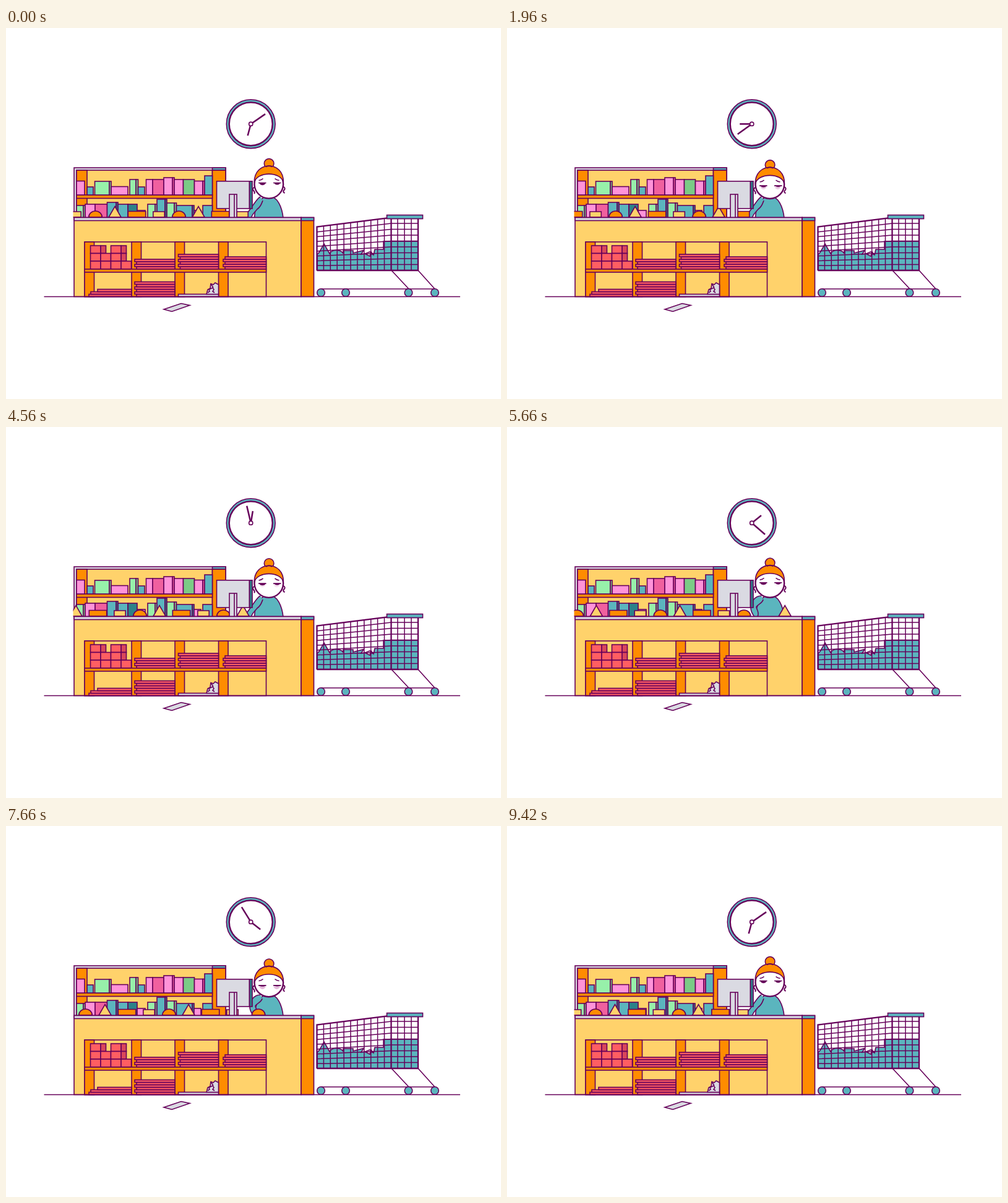
An HTML page that plays this animation: 800 by 600 pixels, repeating every 9440 ms.

```html
<!DOCTYPE html>
<html lang="en">
<head>
<meta charset="utf-8">
<title>Checkout</title>
<style>
  html, body { margin: 0; width: 100%; height: 100%; overflow: hidden; background: #fff; }
  svg { display: block; width: 800px; height: 600px; }
</style>
</head>
<body>
<svg id="stage" viewBox="0 0 800 600" fill="none" stroke="#66005a" stroke-width="1.6"></svg>
<script>
const LOOP = 9440, TURN = 9420;
const ORANGE = '#ff8c00', YELLOW = '#ffd26b', GREY = '#dadae2', TEAL = '#5bb5be',
      PINK = '#ff93d9', ROSE = '#f0609f', GREEN = '#97f0aa', LEAF = '#7bcb86',
      DEEP = '#2c8289', RED = '#ff5e62', CRIMSON = '#d9475a', INK = '#66005a';
const stage = document.getElementById('stage');

function add(parent, tag, attrs) {
  const el = document.createElementNS('http://www.w3.org/2000/svg', tag);
  for (const key in attrs) el.setAttribute(key, attrs[key]);
  parent.appendChild(el);
  return el;
}
const group = (attrs, parent = stage) => add(parent, 'g', attrs);
const path = (d, fill = 'none', parent = stage, width = 1.6) =>
  add(parent, 'path', { d, fill, 'stroke-width': width });
const circle = (cx, cy, r, fill, parent = stage, width = 1.6) =>
  add(parent, 'circle', { cx, cy, r, fill, 'stroke-width': width });
const box = (x1, y1, x2, y2, fill, parent = stage) =>
  add(parent, 'rect', { x: x1, y: y1, width: x2 - x1, height: y2 - y1, fill });
const lerp = (a, b, k) => a + (b - a) * k;

// Monotone cubic through [time, value] keys, at rest at both ends.
function track(t, keys) {
  const last = keys.length - 1;
  if (t <= keys[0][0]) return keys[0][1];
  if (t >= keys[last][0]) return keys[last][1];
  const chord = i => (keys[i + 1][1] - keys[i][1]) / (keys[i + 1][0] - keys[i][0]);
  const slope = i => {
    if (i === 0 || i === last) return 0;
    const a = chord(i - 1), b = chord(i);
    return a * b <= 0 ? 0 : 2 * a * b / (a + b);
  };
  let i = 0;
  while (t > keys[i + 1][0]) i++;
  const [t0, v0] = keys[i], [t1, v1] = keys[i + 1], span = t1 - t0, u = (t - t0) / span;
  return v0 + (v1 - v0) * u * u * (3 - 2 * u)
    + span * u * (1 - u) * (slope(i) * (1 - u) - slope(i + 1) * u);
}

function drawClock() {
  circle(395.7, 155.2, 39.4, TEAL);
  circle(395.7, 155.2, 35, '#fff', stage, 2.4);
  const pivot = group({ transform: 'translate(395.7 155.2)' });
  const hour = path('M0 0V-19.5', 'none', pivot, 2.5);
  const minute = path('M0 0V-28.3', 'none', pivot, 2.5);
  circle(0, 0, 3.1, '#fff', pivot);
  return { hour, minute };
}

// Each product: left, right, top, colour.
function drawRow(base, products) {
  for (const [left, right, top, fill] of products) box(left, top, right, base, fill);
}

function drawBackShelf() {
  box(110, 226, 355, 308, GREY);
  box(333.5, 226, 355, 230, TEAL);
  box(114, 230, 333.5, 308, YELLOW);
  box(114, 230, 131, 288, ORANGE);
  box(333.5, 230, 355, 308, ORANGE);
  box(114, 270, 333.5, 275.5, ORANGE);
  drawRow(270, [
    [114, 127, 247.5, PINK], [131, 141, 257, TEAL], [143.5, 167, 248, GREEN], [167, 170, 248, LEAF],
    [170, 197, 256.5, PINK], [200, 210, 245, GREEN], [210, 213.5, 245, LEAF], [213.5, 224, 257, TEAL],
    [226.5, 237, 245, PINK], [237, 255, 245, ROSE], [255, 269, 242, PINK], [269, 272, 242, ROSE],
    [272, 286.5, 245, PINK], [286.5, 304.5, 245, LEAF], [304.5, 318, 247.5, PINK],
    [318, 321, 247.5, ROSE], [321, 333.5, 239, TEAL]
  ]);
  drawRow(307, [
    [114, 125, 287, GREEN], [125, 128, 287, LEAF], [128, 144, 285, PINK], [144, 163.5, 285, ROSE],
    [163.5, 178, 282, TEAL], [178, 181, 282, DEEP], [181, 197, 285, TEAL], [197, 212, 285, DEEP],
    [212, 225, 295, PINK], [229, 241, 285, GREEN], [241, 244, 285, LEAF], [244, 257, 277, TEAL],
    [257, 260, 277, DEEP], [260, 272, 283, GREEN], [272, 275.5, 283, LEAF], [275.5, 301, 287, TEAL],
    [301, 304, 287, DEEP], [304, 315, 295, PINK], [318, 333.5, 287, TEAL]
  ]);
}

function drawCashier() {
  path('M401.5 307C402 288 411 272 425 272C439 272 446 290 448 307Z', TEAL);
  const head = group();
  path('M402 257q-5 3-2 6t1 5M447.5 256q5 3 2 6t1 5', 'none', head, 2);
  circle(424.8, 252.3, 23.3, '#fff', head, 2.4);
  const hair = group({}, head);
  circle(425.1, 219.2, 7.8, ORANGE, hair);
  path('M401.3 250C400 214 450 214 448.3 250C445 231.500 405 231.500 401.3 250Z', ORANGE, hair);
  path('M420 224.500Q425 221.500 430 224.500', 'none', hair, 2);
  const brows = path('M408.500 246.500Q413 246 415.500 243.500M434.500 243.500Q437 246 441.500 246.500', 'none', head);
  const eyes = group({}, head);
  const bags = path('M409 2Q414.500 10 420 2M432 2Q437.500 10 443 2', '#e6b9dc', eyes);
  bags.setAttribute('stroke', 'none');
  const lids = path('M408 0H420.500M432 0H444.500', 'none', eyes);
  const pupils = path('M409.500 0A5.200 4.800 0 0 0 419.500 0ZM433.500 0A5.200 4.800 0 0 0 443 0Z', INK, eyes, .5);
  return { head, hair, brows, eyes, bags, lids, pupils, arm: path('', TEAL) };
}

const ARM_OUT = [411,273, 405,275, 398,291, 386,304, 387,305, 388,306, 388,307,
                 396,307, 399,299, 402,298, 406,293, 412,289, 413,284, 415,279, 414,274, 411,273];
const ARM_IN = [411,273, 401,273, 394,282, 394,293, 394,299, 397,303, 400,307,
                405,307, 408,299, 404,297, 403,291, 405,287, 413,285, 414,279, 415,275, 413,273, 411,273];
function armPath(bend) {
  const p = ARM_OUT.map((v, i) => lerp(v, ARM_IN[i], bend).toFixed(2));
  return `M${p.slice(0, 2)}C${p.slice(2, 14)}L${p.slice(14, 16)}C${p.slice(16)}`;
}

const KINDS = [
  { d: 'M-9.200 306V297H9.200V306Z', fill: YELLOW, start: 382,
    slide: [[30, 382], [400, 418], [860, 523], [960, 535.5], [1560, 612]] },
  { d: 'M-14.200 306V296.500H14.200V306Z', fill: ORANGE, start: 346.5,
    slide: [[1930, 377.5], [2980, 411], [3400, 438], [3840, 517], [4560, 614]] },
  { d: 'M-10 306L0 288.500L10 306Z', fill: YELLOW, start: 311,
    slide: [[4640, 383], [5300, 403], [5660, 449], [5760, 471.5], [6480, 612]] },
  { d: 'M-10.800 306A10.800 10 0 0 1 10.800 306Z', fill: ORANGE, start: 279.5,
    slide: [[6750, 383], [7660, 408], [8050, 478], [8590, 609]] }
];
const PERIOD = 135;

function drawItems() {
  const clip = add(add(stage, 'defs'), 'clipPath', { id: 'belt' });
  add(clip, 'rect', { x: 108.500, y: 200, width: 600, height: 250 });
  const layer = group({ 'clip-path': 'url(#belt)' });
  const items = [];
  for (let lap = 0; lap < 4; lap++)
    for (const kind of KINDS) items.push({ kind, lap, el: path(kind.d, kind.fill, layer) });
  return items;
}

function drawMonitor() {
  box(340.500, 247.800, 393.500, 292, GREY);
  box(393.500, 247.800, 398, 292, DEEP);
  box(361, 269, 373, 307, GREY);
  path('M369 269V307');
}

function drawStack(left, right, bottom, count, fill = RED) {
  for (let i = 0; i < count; i++) box(left + (i % 2 ? 0 : 3), bottom - 4 * (i + 1), right, bottom - 4 * i, fill);
}

function drawCounter() {
  box(110, 306.500, 477, 434.500, YELLOW);
  box(110, 306.500, 477, 311.500, GREY);
  box(477, 306.500, 497.500, 434.500, ORANGE);
  box(477, 306.500, 497.500, 311.500, TEAL);
  box(127, 346, 420.500, 434.500, YELLOW);
  for (const x of [127, 203, 273, 343.500]) box(x, 346, x + 15.500, 434.500, ORANGE);
  for (const [x, y, dark] of [[136.500, 352], [153, 352, 1], [169.500, 352], [186, 352, 1],
    [136.500, 364.500], [153, 364.500], [169.500, 364.500], [186, 364.500, 1],
    [136.500, 377], [153, 377], [169.500, 377], [186, 377]])
    box(x, y, x + (dark ? 8.500 : 16.500), y + 12.500 + (y > 370 ? .500 : 0), dark ? CRIMSON : RED);
  drawStack(208, 273, 390, 4);
  drawStack(278.500, 343.500, 390, 6);
  drawStack(351, 420.500, 390, 5);
  drawStack(208, 273, 434.500, 6);
  box(134, 430.500, 203, 434.500, RED);
  box(137, 426.500, 203, 430.500, RED);
  box(148, 422.500, 203, 426.500, RED);
  box(278.500, 430.500, 343.500, 434.500, GREY);
  path('M324 430.500L326 423L330 421L331 413.500L335 415L338 412L343.500 415V430.500Z', GREY);
  path('M326 428L329 426L328 423L334 420L336 423L334 426L337 428M331 413.500L335 420');
  box(127, 390, 420.500, 395, ORANGE);
}

function drawCart() {
  path('M503 392V366L506 363L514 349L523 365Q526 359 535 359.500Q543 360 545 365V360H561V364L578 359.500L574 366L580 365L588 369L590 362L594 367L596 358H610V345H666V392Z', TEAL);
  path('M578 366L588 362L592 367');
  let mesh = '';
  for (let i = 1; i < 11; i++) {
    const x = 502.500 + i * 10.900;
    mesh += `M${x} ${322 - i * 1.400}V392`;
  }
  for (const x of [633, 644, 655]) mesh += `M${x} 308V392`;
  for (let i = 1; i < 9; i++) {
    const left = lerp(322, 392, i / 9), right = lerp(306.500, 392, i / 9);
    mesh += `M502.500 ${left}L622.500 ${right}H666`;
  }
  path(mesh, 'none', stage, 1.500);
  path('M502.500 392V321.500L622.500 306.500V392M666 307V392H502.500', 'none', stage, 2.300);
  box(615.500, 302.500, 673.500, 308.500, TEAL);
  path('M623 392L651 422M666 392L693 422M509 422H693');
  for (const x of [509, 549, 650.500, 693]) circle(x, 428, 6.300, TEAL);
}

const clock = drawClock();
drawBackShelf();
const cashier = drawCashier();
const items = drawItems();
drawMonitor();
drawCounter();
drawCart();
path('M61.500 434.500H734');
path('M255 455L283 445.500L297 448.500L268 458.500Z', GREY);

const BELT = [[0, 0], [900, 31], [1920, 31], [2980, 60], [3900, 72], [4600, 72],
              [5700, 103.5], [6740, 103.5], [7660, 119], [8600, 133.5]];
const ARM = [[0, 0], [480, 1], [1450, 1], [1920, 0], [2100, 0], [2760, 1], [3850, 1], [4400, 0],
             [4640, 0], [5300, 1], [6250, 1], [6720, 0], [6850, 0], [7450, 1], [8700, 1], [9300, 0]];
const NOD = [[0, 0], [860, .2], [2980, 1], [4560, .4], [5660, .2], [7660, 1.12], [9400, 0]];

function moveItem({ kind, lap, el }, t, belt) {
  let x = kind.start - lap * PERIOD + belt, drop = 0;
  const { slide } = kind;
  if (lap === 0 && t >= slide[0][0]) {
    x = track(t, slide);
    drop = 3 * Math.pow(Math.max(0, x - 493) / 30, 2.2);
  }
  const gone = lap === 0 && t >= slide[slide.length - 1][0];
  el.setAttribute('visibility', gone ? 'hidden' : 'visible');
  el.setAttribute('transform', `translate(${x} ${drop})`);
}

function render(t) {
  const turn = t / TURN;
  clock.hour.setAttribute('transform', `rotate(${195 + 360 * turn})`);
  clock.minute.setAttribute('transform', `rotate(${55 + 4320 * turn})`);

  const belt = track(t, BELT);
  for (const item of items) moveItem(item, t, belt);

  const nod = track(t, NOD);
  cashier.head.setAttribute('transform', `translate(0 ${.6 * nod})`);
  cashier.hair.setAttribute('transform', `translate(0 ${2.6 * nod})`);
  cashier.brows.setAttribute('transform', `translate(0 ${3 * nod})`);
  cashier.eyes.setAttribute('transform', `translate(0 ${250.5 + 6 * nod})`);
  cashier.pupils.setAttribute('transform', `scale(1 ${1 - .45 * nod})`);
  cashier.bags.setAttribute('opacity', Math.min(1, nod));
  cashier.arm.setAttribute('d', armPath(track(t, ARM)));
}

const began = performance.now();
function tick() {
  render((performance.now() - began) % LOOP);
  requestAnimationFrame(tick);
}
render(0);
requestAnimationFrame(tick);
</script>
</body>
</html>
```
